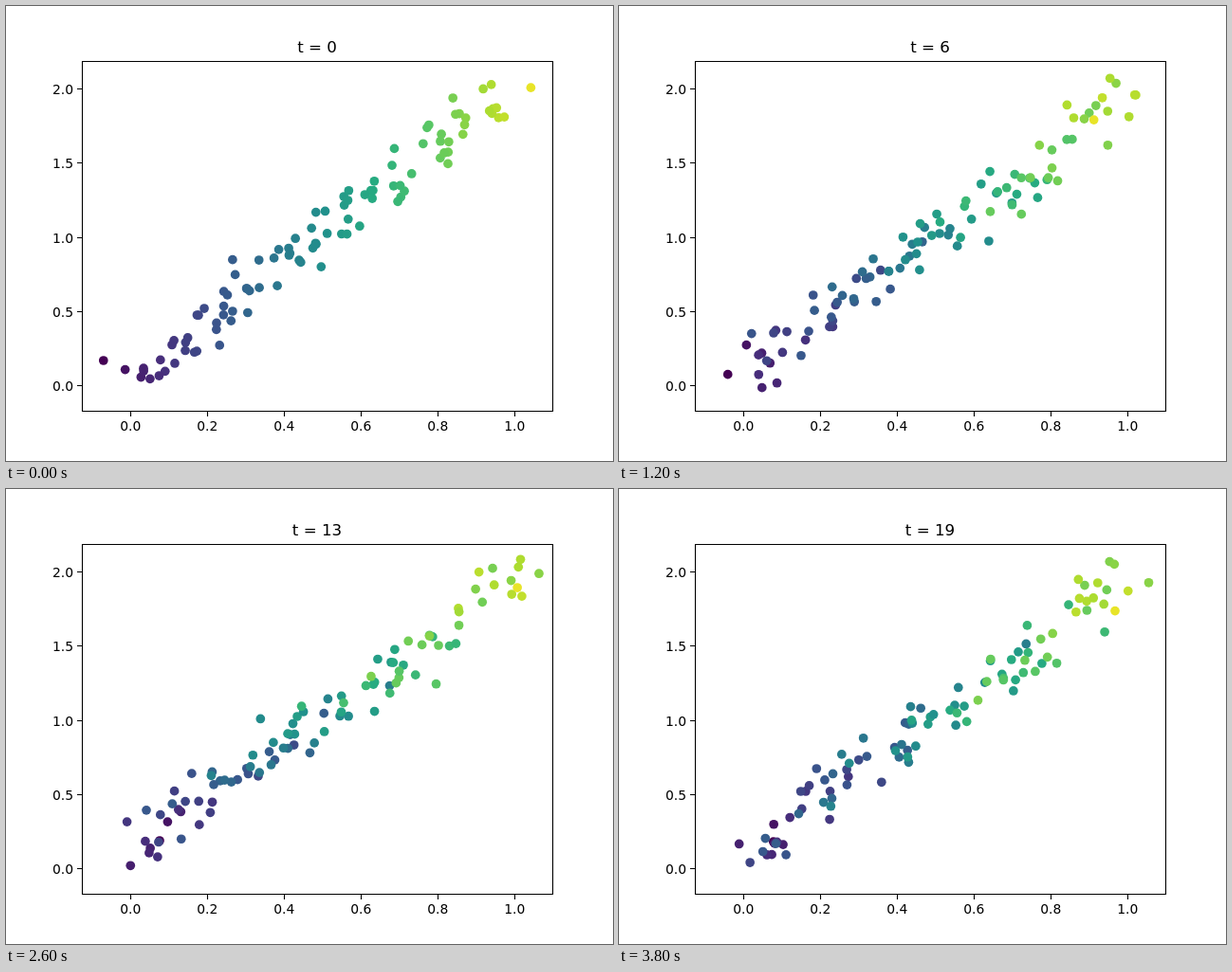
These frames come from a looping animation (640 px wide and 480 px high, 4000 ms). An HTML page:

```html
<!DOCTYPE html>
<html lang="en">
<head>
<meta charset="utf-8">
<title>Scatter walk</title>
<style>
html, body { margin: 0; width: 100%; height: 100%; overflow: hidden; background: #fff }
svg { display: block; font: 13.89px "DejaVu Sans", sans-serif }
path { fill: none; stroke: #000; stroke-width: 1.11 }
</style>
</head>
<body>
<svg width="640" height="480" viewBox="0 0 640 480">
  <clipPath id="area"><rect x="80" y="58" width="496.5" height="369.5"/></clipPath>
  <g id="dots" clip-path="url(#area)"></g>
  <path id="axes"/>
  <g id="labels"></g>
  <text id="title" x="328" y="49" font-size="16.67" text-anchor="middle"></text>
</svg>
<script>
const STEPS = 20, STEP_MS = 200, COUNT = 100;
const $ = id => document.getElementById(id);
const px = x => 131.3 + 405 * x;
const py = y => 400.4 - 156.8 * y;

function add(parent, tag, attrs, text = '') {
  const el = document.createElementNS('http://www.w3.org/2000/svg', tag);
  for (const key in attrs) el.setAttribute(key, attrs[key]);
  el.textContent = text;
  return parent.appendChild(el);
}

let seed = 7;
function random() {
  seed = (Math.imul(seed, 1664525) + 1013904223) >>> 0;
  return seed / 2 ** 32;
}
const gauss = () => 2 * (random() + random() + random() - 1.5);

// Reflects a value back into 0..1.
const fold = v => v < 0 ? -v : v > 1 ? 2 - v : v;

// Noisy sample around y = 2x; the line bends into a slight S as the walk goes on.
function sample(base, t) {
  const bend = 0.07 * Math.min(1, t / 4) * Math.sin(2 * Math.PI * base);
  return [base + 0.042 * gauss(), 2 * base + bend + 0.07 * gauss()];
}

let bases = Array.from({ length: COUNT }, (_, i) => (i + 0.5) / COUNT);
const steps = [];
for (let t = 0; t < STEPS; t++) {
  steps.push(bases.map(base => sample(base, t)));
  bases = bases.map(base => fold(base + 0.024 * gauss()));
}

const viridis = [
  [68, 1, 84], [71, 45, 123], [59, 82, 139], [44, 114, 142], [33, 145, 140],
  [40, 174, 128], [94, 201, 98], [173, 220, 48], [253, 231, 37]
];
function colour(value) {
  const v = Math.max(0, Math.min(1, value)) * 8;
  const i = Math.min(7, Math.floor(v));
  return `rgb(${viridis[i].map((c, k) => Math.round(c + (v - i) * (viridis[i + 1][k] - c)))})`;
}
const dots = steps[0].map(([x]) =>
  add($('dots'), 'circle', { r: 4.86, fill: colour((x + 0.07) * 0.87) }));

let axes = 'M80.5 58.5H576.5V427.5H80.5Z';
for (let i = 0; i < 6; i++) {
  const x = Math.floor(px(i / 5));
  axes += `M${x + 0.5} 428v5`;
  add($('labels'), 'text', { x: x + 0.3, y: 448, 'text-anchor': 'middle' }, (i / 5).toFixed(1));
}
for (let i = 0; i < 5; i++) {
  const y = Math.round(py(i / 2));
  axes += `M75 ${y + 0.5}h5`;
  add($('labels'), 'text', { x: 71, y: y + 5.5, 'text-anchor': 'end' }, (i / 2).toFixed(1));
}
$('axes').setAttribute('d', axes);

let shown = -1;
function tick() {
  const t = Math.floor(performance.now() / STEP_MS) % STEPS;
  if (t !== shown) {
    shown = t;
    $('title').textContent = `t = ${t}`;
    dots.forEach((dot, i) => {
      const [x, y] = steps[t][i];
      dot.setAttribute('cx', px(x));
      dot.setAttribute('cy', py(y));
    });
  }
  requestAnimationFrame(tick);
}
tick();
</script>
</body>
</html>
```
